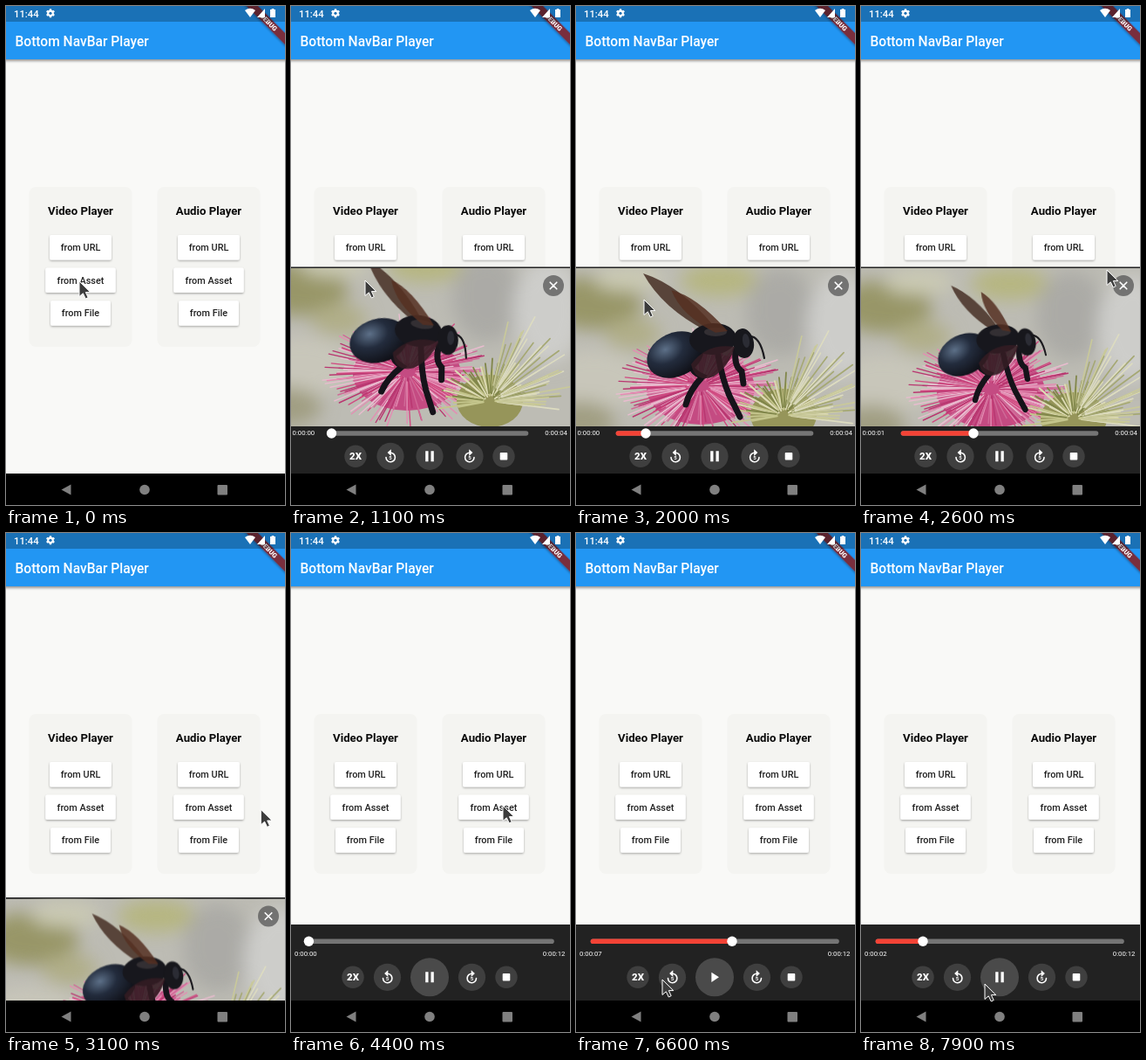
An HTML page for the animation above (8 s loop, 320x571 px).

```html
<!DOCTYPE html>
<html lang="en">
<head>
<meta charset="utf-8">
<title>Bottom NavBar Player</title>
<style>
html, body { margin: 0; width: 100%; height: 100%; overflow: hidden; background: #000; }
svg { display: block; width: 100%; height: 100%; font-family: Roboto, sans-serif; }
.mid { text-anchor: middle; }
.end { text-anchor: end; }
.line { fill: none; stroke-linecap: round; }
</style>
</head>
<body>
<svg id="stage" viewBox="0 0 320 571" xmlns="http://www.w3.org/2000/svg"></svg>
<script>
const LOOP = 8000, STEP = 100;

// ---------- helpers ----------
let seed = 11;
const random = () => (seed = (seed * 16807) % 2147483647) / 2147483647;
const $ = id => document.getElementById(id);
const smooth = k => k * k * (3 - 2 * k);
const linear = k => k;

// Values between keys of the form [time, ...values].
function at(t, keys, ease = linear) {
  const next = keys.findIndex(key => key[0] > t);
  if (next === 0) return keys[0].slice(1);
  if (next < 0) return keys[keys.length - 1].slice(1);
  const [t0, ...a] = keys[next - 1], [t1, ...b] = keys[next];
  const k = ease((t - t0) / (t1 - t0));
  return a.map((v, i) => v + (b[i] - v) * k);
}

const rect = (x, y, w, h, fill, more = '') =>
  `<rect x="${x}" y="${y}" width="${w}" height="${h}" fill="${fill}" ${more}/>`;
const circle = (x, y, r, fill, more = '') =>
  `<circle cx="${x}" cy="${y}" r="${r}" fill="${fill}" ${more}/>`;
const ellipse = (x, y, rx, ry, fill, turn = 0) =>
  `<ellipse rx="${rx}" ry="${ry}" fill="${fill}" transform="translate(${x} ${y}) rotate(${turn})"/>`;
const path = (d, fill, more = '') => `<path d="${d}" fill="${fill}" ${more}/>`;
const line = (d, stroke, width, more = '') =>
  `<path class="line" d="${d}" stroke="${stroke}" stroke-width="${width}" ${more}/>`;
const text = (x, y, size, fill, content, more = '') =>
  `<text x="${x}" y="${y}" font-size="${size}" fill="${fill}" ${more}>${content}</text>`;

// ---------- app screen ----------
function card(cx, title) {
  const button = (label, y, w) =>
    rect(cx - w / 2, y, w, 28.5, '#fff', 'rx="2" filter="url(#lift)"') +
    text(cx, y + 18, 10.9, '#222', label, 'class="mid" font-weight="500"');
  return rect(cx - 59, 207, 118, 183, '#f4f4f1', 'rx="8"') +
    text(cx, 238.6, 13.2, '#0a0a0a', title, 'class="mid" font-weight="700"') +
    button('from URL', 262, 71) + button('from Asset', 299.6, 80.5) + button('from File', 337.3, 69);
}

function gear(x, y) {
  const teeth = [0, 60, 120].map(a => rect(-1.2, -5, 2.4, 10, '#fff', `transform="rotate(${a})"`)).join('');
  return `<g transform="translate(${x} ${y})">${teeth}${circle(0, 0, 3.8, '#fff')}${circle(0, 0, 1.6, '#1c6fb3')}</g>`;
}

const banner = `<g transform="translate(320 0) rotate(45)">
  ${rect(-34, 21.8, 68, 9.4, '#792d3e', 'filter="url(#lift)"')}
  ${text(0, 29.2, 7.6, '#fff', 'DEBUG', 'class="mid" font-weight="900"')}</g>`;

const statusBar = rect(0, 0, 320, 18, '#000', 'opacity=".25"') +
  text(9, 12.8, 11.3, '#fff', '11:44', 'font-weight="500"') + gear(51, 8.3) +
  path('M274 5Q280 0.6 286 5L280 13Z', '#fff') +
  path('M297 3V13H288Z', '#fff') +
  path('M303 4H304.7V3H307.3V4H309V13H303Z', '#fff');

const home = rect(0, 0, 320, 571, '#f9f9f7') +
  rect(-10, -10, 340, 71, '#2196f3', 'filter="url(#barShadow)"') +
  text(10.5, 45.6, 15.57, '#fff', 'Bottom NavBar Player', 'font-weight="500"') +
  card(85.5, 'Video Player') + card(232.5, 'Audio Player') + banner + statusBar;

const navBar = rect(0, 535, 320, 36, '#000') +
  path('M63.5 553.5L74.5 547.5V559.5Z', '#808080') +
  circle(159, 553.5, 5.8, '#808080') + rect(242.5, 548, 11.5, 11.5, '#808080', 'rx="1"');

// ---------- player controls ----------
function skipIcon(x, y, flip) {
  return `<g transform="translate(${x} ${y})"><g transform="scale(${flip} 1)">
    ${line('M-5 1.2A5.2 5.2 0 1 0 0 -4', '#fff', 1.6)}${path('M0.8 -8V-0.4L-3.4 -4.2Z', '#fff')}</g>
    ${text(0, 3.4, 6, '#fff', '5', 'class="mid" font-weight="700"')}</g>`;
}

function controls(name, { y, xs, mainRadius, mainFill, trackY, from, to, labelY, labelX, total }) {
  const [speed, back, main, ahead, stop] = xs;
  const track = (id, x2, color) =>
    line(`M${from} ${trackY}H${x2}`, color, 5.6, `id="${id}"`);
  return track(name + 'Track', to, '#757575') + track(name + 'Done', from, '#f44336') +
    circle(from, trackY, 5.7, '#fff', `id="${name}Thumb"`) +
    text(labelX, labelY, 7.8, '#fff', '0:00:00', `id="${name}Time"`) +
    text(318.5 - labelX, labelY, 7.8, '#fff', total, 'class="end"') +
    circle(speed, y, 12.7, '#3f3f3f') +
    text(speed, y + 4, 11.4, '#fff', '2X', 'class="mid" font-weight="900"') +
    circle(back, y, 15.6, '#3f3f3f') + skipIcon(back, y, 1) +
    circle(main, y, mainRadius, mainFill) +
    `<path id="${name}Icon" fill="#fff" transform="translate(${main} ${y})"/>` +
    circle(ahead, y, 15.6, '#3f3f3f') + skipIcon(ahead, y, -1) +
    circle(stop, y, 12.7, '#3f3f3f') + rect(stop - 4.3, y - 4.3, 8.6, 8.6, '#fff', 'rx="1"');
}

const video = { y: 515.3, xs: [74, 114, 159, 205, 244], mainRadius: 15.6, mainFill: '#3f3f3f',
  trackY: 489, from: 48.5, to: 269.5, labelY: 491, labelX: 1.5, total: '0:00:04' };
const audio = { y: 508.3, xs: [71, 110.5, 159, 207.5, 247], mainRadius: 22, mainFill: '#4a4a4a',
  trackY: 467.3, from: 19.5, to: 299, labelY: 483.8, labelX: 4, total: '0:00:12' };

// ---------- video picture ----------
function spikes(count, cx, cy, rx, ry, start, sweep, colors, width) {
  let out = '';
  for (let i = 0; i < count; i++) {
    const a = start + sweep * random(), reach = 0.5 + 0.5 * random();
    const dx = rx * reach * Math.cos(a), dy = ry * reach * Math.sin(a);
    out += line(`M${(cx + dx * 0.2).toFixed(1)} ${(cy + dy * 0.2).toFixed(1)}l${(dx * 0.8).toFixed(1)} ${(dy * 0.8).toFixed(1)}`,
      colors[i % colors.length], width);
  }
  return out;
}

const backdrop = `<g id="backdrop" filter="url(#soft)">
  ${ellipse(20, 340, 55, 30, '#989668')}${ellipse(60, 312, 40, 14, '#cbcab4')}
  ${ellipse(65, 375, 32, 18, '#b0ae88')}${ellipse(20, 428, 60, 34, '#c8c6ba')}
  ${ellipse(165, 314, 45, 18, '#b6b680')}${ellipse(235, 350, 40, 50, '#abaaa6')}
  ${ellipse(305, 365, 40, 60, '#cdcdca')}${ellipse(5, 474, 40, 22, '#a09e82')}</g>`;

const flower = `<g id="flower">
  ${ellipse(143, 437, 62, 42, '#c44b82')}
  ${spikes(230, 143, 434, 98, 66, 0, 2 * Math.PI, ['#d04a80', '#e48db3', '#b93670', '#e9bccf', '#cf6a97'], 1.4)}
  ${ellipse(238, 468, 38, 30, '#96955a')}
  ${spikes(60, 238, 468, 62, 50, 2.7, 3.9, ['#c4c58c', '#80864a', '#dcdab4'], 1.8)}
  ${spikes(34, 238, 468, 98, 115, 4.9, 1.5, ['#c9c99a', '#a5a873', '#dddcc0'], 1.6)}</g>`;

const bee = `<g id="bee">
  ${line('M140 398Q122 414 145 424Q130 440 126 456M163 400Q168 428 176 446L188 470M183 394Q181 412 190 418L192 432', '#16131a', 7)}
  ${line('M198 378Q211 377 216 403', '#1b1a1e', 2.2)}
  ${path('M158 366Q118 319 77 306Q99 346 150 372Z', '#4a342a', 'id="farWing" opacity=".88"')}
  ${ellipse(114, 399, 34, 25, 'url(#shell)', -24)}
  ${ellipse(157, 381, 27, 18, '#17171d', -4)}${ellipse(160, 373, 13, 5, '#332f33')}
  ${ellipse(192, 386, 12, 17, '#17171c', -8)}${ellipse(195, 383, 4, 8, '#2b2c34', -8)}
  ${path('M182 390Q150 385 132 410Q137 432 158 424Q176 412 182 390Z', '#341c23', 'opacity=".9"')}
  ${path('M174 372Q140 330 112 322Q122 352 160 373Z', '#553022', 'id="nearWing" opacity=".85"')}</g>`;

const videoSheet = `<g id="videoSheet">
  ${rect(0, 298.5, 320, 240, '#222')}
  <g clip-path="url(#screen)">${rect(0, 300, 320, 181, '#bdbcb4')}${backdrop}
    <g filter="url(#focus)">${flower}${bee}</g></g>
  ${circle(301, 320, 12, '#555', 'opacity=".75"')}
  ${line('M297.2 316.2L304.8 323.8M304.8 316.2L297.2 323.8', '#fff', 1.6)}
  ${controls('video', video)}</g>`;

const audioSheet = rect(0, 535, 320, 240, '#222', 'id="audioBack"') +
  `<g id="audioSheet">${controls('audio', audio)}</g>`;

$('stage').innerHTML = `<defs>
  <filter id="lift" x="-10%" y="-30%" width="120%" height="180%"><feDropShadow dx="0" dy="1.2" stdDeviation="1.1" flood-opacity=".32"/></filter>
  <filter id="barShadow" x="0" y="0" width="100%" height="120%"><feDropShadow dx="0" dy="2" stdDeviation="1.5" flood-opacity=".4"/></filter>
  <filter id="soft" x="-20%" y="-20%" width="140%" height="140%"><feGaussianBlur stdDeviation="10"/></filter>
  <filter id="focus"><feGaussianBlur stdDeviation=".6"/></filter>
  <radialGradient id="shell" cx=".38" cy=".3" r=".7"><stop stop-color="#5d7088"/>
    <stop offset=".45" stop-color="#232c3d"/><stop offset="1" stop-color="#101118"/></radialGradient>
  <clipPath id="screen"><rect x="0" y="300" width="320" height="181"/></clipPath></defs>
  ${home}${videoSheet}${audioSheet}${navBar}
  ${path('M0 0V17.5L4.3 13.8L7.3 20L10.2 18.6L7.4 12.6H12.8Z', '#3c3c3c', 'id="cursor" stroke="#fff" stroke-width="1" stroke-linejoin="round"')}`;

// ---------- motion ----------
const PLAY = 'M-3.6 -5.6V5.6L5 0Z';
const PAUSE = 'M-4.8 -6H-1.5V6H-4.8ZM1.5 -6H4.8V6H1.5Z';

const cursorKeys = [[0, 84, 315], [100, 85, 314], [1500, 85, 314], [2000, 78, 336], [2600, 282, 302],
  [2800, 298, 317], [3000, 298, 317], [3500, 243, 312], [4800, 243, 312], [5600, 205, 509],
  [6050, 205, 509], [6300, 157, 510], [6400, 155, 510], [6600, 99, 511], [6950, 103, 511],
  [7400, 146, 514], [7900, 142, 516]];
const videoTop = [[200, 237], [700, 0], [2900, 0], [3300, 237]];
const audioTop = [[3800, 535], [4100, 300], [4200, 300], [4400, 448]];
const videoThumb = [[1100, 46.5], [1500, 50], [2000, 80], [2600, 129], [2900, 152]];
const audioThumb = [[4250, 17], [5999, 57], [6000, 169.5], [6400, 179], [6899, 179], [6900, 67], [7700, 67], [7900, 71]];
const cameraKeys = [[1100, -10, -16], [2000, 0, 0], [2600, 6, 4], [3000, 8, 6]];
// x, y, tilt, size, far wing turn, near wing turn, wing length
const beeKeys = [[1100, -11, -9, 9, 1, 2, -1, 0.9], [2000, 0, 0, 0, 1, 0, -3, 1],
  [2600, 0, 0, -2, 0.92, 7, 16, 0.78], [3000, 2, 2, 0, 0.94, 4, 6, 0.85]];

const move = (id, x, y, more = '') => $(id).setAttribute('transform', `translate(${x} ${y}) ${more}`);
// Rotates and scales a part about its joint.
const pivot = (id, x, y, turn, size, dx = 0, dy = 0) =>
  move(id, x + dx, y + dy, `rotate(${turn}) scale(${size}) translate(${-x} ${-y})`);

function setPlayer(name, { from, trackY }, x, seconds, playing) {
  $(name + 'Thumb').setAttribute('cx', x);
  $(name + 'Done').setAttribute('d', `M${from} ${trackY}H${Math.max(from, x)}`);
  $(name + 'Done').style.display = x > from + 2 ? '' : 'none';
  $(name + 'Time').textContent = '0:00:0' + Math.floor(seconds);
  $(name + 'Icon').setAttribute('d', playing ? PAUSE : PLAY);
}

function draw(t) {
  move('cursor', ...at(t, cursorKeys, smooth));

  move('videoSheet', 0, at(t, videoTop, smooth)[0]);
  const [vx] = at(t, videoThumb);
  setPlayer('video', video, vx, (vx - 46.5) / 56, t >= 1000);

  const camera = at(t, cameraKeys);
  move('backdrop', ...camera);
  move('flower', ...camera);
  const [dx, dy, tilt, size, far, near, wing] = at(t, beeKeys);
  pivot('bee', 158, 381, tilt, size, dx, dy);
  pivot('farWing', 156, 368, far, wing);
  pivot('nearWing', 172, 373, near, wing);

  const [top] = at(t, audioTop, smooth);
  $('audioBack').setAttribute('y', top);
  move('audioSheet', 0, Math.max(0, top - 448));
  const [ax] = at(t, audioThumb);
  setPlayer('audio', audio, ax, (ax - 17) / 22.4, (t >= 4250 && t < 6400) || t >= 7700);
}

const start = performance.now();
function tick() {
  const t = (performance.now() - start) % LOOP;
  draw(Math.floor(t / STEP) * STEP);
  requestAnimationFrame(tick);
}
tick();
</script>
</body>
</html>
```
